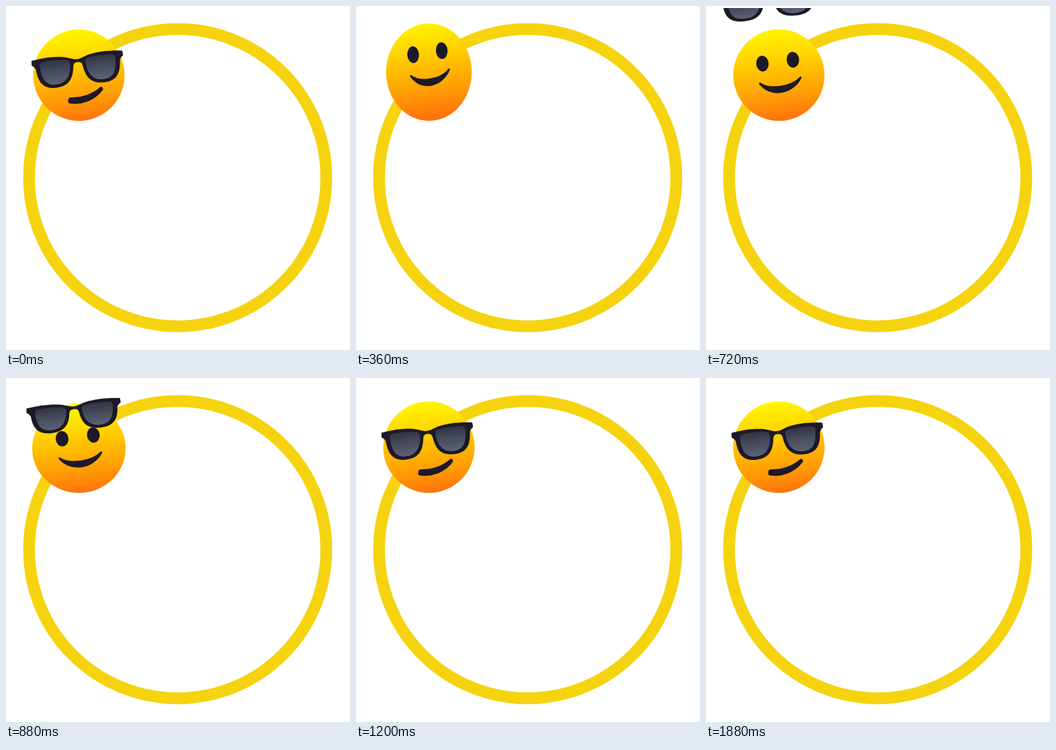
Animation, 512 px wide and 512 px high, one loop 1.92 s. Source, as an HTML page with a canvas:

```html
<!DOCTYPE html>
<html lang="en">
<head>
<meta charset="utf-8">
<title>Cool face on a ring</title>
<style>
  html, body { margin: 0; width: 100%; height: 100%; overflow: hidden; background: #fff; }
  canvas { display: block; width: 512px; height: 512px; }
</style>
</head>
<body>
<canvas id="stage" width="512" height="512"></canvas>
<script>
const ctx = document.getElementById('stage').getContext('2d');
const LOOP = 1920, STEP = 40, DARK = '#1d1928';
const CENTER = 108.5, FLOOR = 171, RADIUS = 68;
const FALL = 600, LAND = 960;

// Key poses: crouch, reach up, take the glasses, rest
const poses = [
  { time: 40, stretch: 1, pitch: 3 },
  { time: 200, stretch: .971, pitch: 16 },
  { time: 360, stretch: 1.067, pitch: -10 },
  { time: 920, stretch: .976, pitch: 0 },
  { time: 1140, stretch: 1, pitch: 0 },
];

// Mouth outlines: x from the face centre, y on the stage
const smile = [[-28, 118.5], [-28, 118.5], [-14, 128.5], [20, 124], [32.5, 109.5], [20, 134], [-12, 138.5]];
const smirk = [[-13, 142], [-12.5, 139], [3, 140], [21, 134], [33, 123.5], [22, 138], [4, 145]];

const frame = new Path2D('M0-13C6-13 10-16 18-18C32-21 50-21 68-18L68.5-11Q65-9 63-5C62 12 57 25.8 36 25.8C15 25.8 9 13 7-3C6-7 5-8.5 0-8.5Z');
const lens = new Path2D('M11.5-8Q11.5-13.5 19-14C30-15.5 45-15.5 52-14.5Q57-13.5 56.5-8C55.5 9 52 21 35 21C19 21 12.5 9 11.5-8Z');

const clamp = v => Math.min(1, Math.max(0, v));
const ease = u => (1 - Math.cos(Math.PI * clamp(u))) / 2;
const mix = (a, b, u) => a + (b - a) * u;

function poseAt(t) {
  const next = poses.findIndex(p => p.time > t);
  if (next < 1) return poses[poses.length - 1];
  const a = poses[next - 1], b = poses[next];
  const u = ease((t - a.time) / (b.time - a.time));
  return { stretch: mix(a.stretch, b.stretch, u), pitch: mix(a.pitch, b.pitch, u) };
}

// Glasses height from their place: speeding up, then a damped wobble
function dropAt(t) {
  if (t < LAND) return -114 * (1 - ((t - FALL) / (LAND - FALL)) ** 1.6);
  const since = t - LAND;
  return 5 * Math.sin(since / 50) * Math.exp(-since / 80);
}

function gradient(x0, y0, x1, y1, ...colors) {
  const g = ctx.createLinearGradient(x0, y0, x1, y1);
  colors.forEach((c, i) => g.addColorStop(i / (colors.length - 1), c));
  return g;
}

function at(x, y, draw) {
  ctx.save();
  ctx.translate(x, y);
  draw();
  ctx.restore();
}

function drawRing() {
  ctx.strokeStyle = '#f5d30f';
  ctx.lineWidth = 17.5;
  ctx.beginPath();
  ctx.arc(255.5, 255.5, 221.2, 0, 7);
  ctx.stroke();
}

function drawEye(x, y, open) {
  at(x, y, () => {
    ctx.beginPath();
    if (open > .35) {
      ctx.ellipse(0, (1 - open) * 8, 9.3, 11.7 * open, -.1, 0, 7);
      ctx.fill();
    } else {
      ctx.lineWidth = 6;
      ctx.moveTo(-6, 14);
      ctx.quadraticCurveTo(3, 3, 11.5, 12);
      ctx.stroke();
    }
  });
}

function drawMouth(u) {
  const [a, b, c, d, e, f, g] = smile.map(([x, y], i) => [mix(x, smirk[i][0], u), mix(y, smirk[i][1], u)]);
  ctx.lineWidth = 3 + 3 * u;
  ctx.beginPath();
  ctx.moveTo(...a);
  ctx.lineTo(...b);
  ctx.bezierCurveTo(...c, ...d, ...e);
  ctx.bezierCurveTo(...f, ...g, ...a);
  ctx.closePath();
  ctx.fill();
  ctx.stroke();
}

function drawFace(t) {
  const { stretch, pitch } = poseAt(t);
  at(CENTER, FLOOR, () => {
    ctx.scale(1 / stretch, stretch);
    ctx.translate(0, -FLOOR);
    const shade = pitch * .7;
    ctx.fillStyle = gradient(-8, 36 + shade, 8, 170 + shade, '#fff600', '#ffdc00', '#ffbc00', '#ff9c05', '#ff740c');
    ctx.beginPath();
    ctx.arc(0, FLOOR - RADIUS, RADIUS, 0, 7);
    ctx.fill();

    ctx.fillStyle = ctx.strokeStyle = DARK;
    ctx.lineCap = ctx.lineJoin = 'round';
    ctx.translate(pitch * .06, pitch);
    if (t < LAND) {
      const open = clamp((14 - pitch) / 6);
      drawEye(-24.4, 88.7, open);
      drawEye(21, 83, open);
    }
    drawMouth(ease((t - 920) / 120));
  });
}

function drawGlint(t) {
  const x = -33 + (t - 1520) * .32, lean = 10;
  ctx.fillStyle = 'rgba(190,205,220,.24)';
  for (const [from, to] of [[-18, -12], [-8, 14]]) {
    ctx.beginPath();
    ctx.moveTo(x + from + lean, -20);
    ctx.lineTo(x + to + lean, -20);
    ctx.lineTo(x + to - lean, 26);
    ctx.lineTo(x + from - lean, 26);
    ctx.fill();
  }
}

function drawGlasses(t) {
  const drop = dropAt(t);
  ctx.save();
  ctx.beginPath();
  ctx.rect(0, 3, 512, 509);
  ctx.clip();
  at(107.5 + drop * .15, 92 + drop, () => {
    ctx.rotate(-.113);
    ctx.scale(1 - drop * .0008, 1 + drop * .002);
    for (const side of [-1, 1]) {
      ctx.save();
      ctx.scale(side, 1);
      ctx.fillStyle = DARK;
      ctx.fill(frame);
      ctx.fillStyle = gradient(0, -16, 0, 22, '#30333f', '#484d5e', '#5e6476');
      ctx.fill(lens);
      ctx.clip(lens);
      ctx.scale(side, 1);
      drawGlint(t);
      ctx.restore();
    }
  });
  ctx.restore();
}

function render(now) {
  const step = Math.floor(now % LOOP / STEP) * STEP;
  const t = step || LOOP; // the loop opens on its resting pose
  ctx.fillStyle = '#fff';
  ctx.fillRect(0, 0, 512, 512);
  drawRing();
  drawFace(t);
  if (t >= FALL) drawGlasses(t);
}

let start;
function tick(now) {
  start ??= now;
  render(Math.max(0, now - start));
  requestAnimationFrame(tick);
}
requestAnimationFrame(tick);
</script>
</body>
</html>
```
